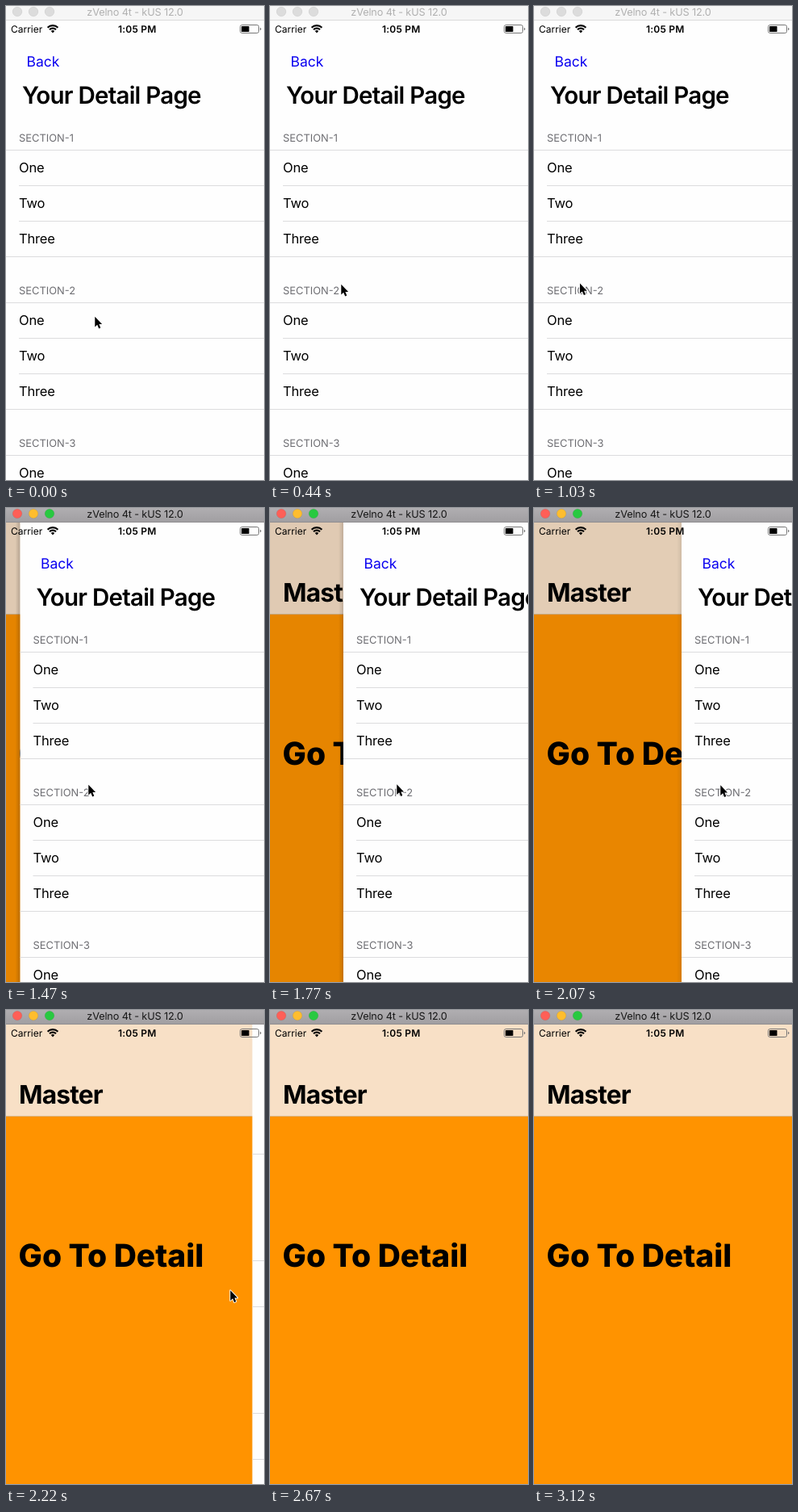
Recreate the animation shown at these times as an HTML page. Size 320 by 587 pixels, loop 3.72 s.

```html
<!DOCTYPE html>
<html lang="en">
<head>
<meta charset="utf-8">
<title>Swipe back</title>
<style>
  html, body { margin: 0; width: 100%; height: 100%; overflow: hidden; background: #fff; }
  svg { display: block; width: 100%; height: 100%; }
  text {
    font-family: Inter, Roboto, sans-serif;
    font-optical-sizing: none;
    text-rendering: geometricPrecision;
    white-space: pre;
  }
  .caption { font-size: 12.7px; letter-spacing: -.01em; text-anchor: middle; }
  .carrier { font-size: 12px; }
  .clock { font-size: 12px; font-weight: 600; letter-spacing: .2px; }
  .master { font-size: 31.7px; font-weight: 700; letter-spacing: -.025em; }
  .link { font-size: 39px; font-weight: 800; }
  .back { font-size: 17.5px; fill: #0a00f0; }
  .heading { font-size: 29.5px; font-weight: 600; letter-spacing: -.026em; }
  .section { font-size: 12.9px; fill: #6d6d72; }
  .row { font-size: 16.5px; letter-spacing: -.01em; }
</style>
</head>
<body>
<svg viewBox="0 0 320 587" xmlns="http://www.w3.org/2000/svg">
  <defs>
    <linearGradient id="edge">
      <stop offset="0" stop-opacity="0"/>
      <stop offset="1" stop-opacity=".2"/>
    </linearGradient>
    <linearGradient id="chrome" x2="0" y2="1">
      <stop offset="0" stop-color="#b0aeb1"/>
      <stop offset="1" stop-color="#a09ea1"/>
    </linearGradient>
  </defs>

  <g id="masterView">
    <rect y="17" width="320" height="114" fill="#f8e0c6"/>
    <rect y="131" width="320" height="1" fill="#d9b98c"/>
    <rect y="132" width="320" height="455" fill="#ff9300"/>
    <text class="master" x="16" y="116">Master</text>
    <text class="link" x="15.6" y="318">Go To Detail</text>
    <rect id="dim" y="17" width="320" height="570"/>
  </g>

  <g id="page">
    <rect id="shadow" x="-6" y="18" width="6" height="569" fill="url(#edge)"/>
    <rect y="17" width="320" height="570" fill="#fefefe"/>
    <text class="back" x="25.5" y="75">Back</text>
    <text class="heading" x="20" y="121">Your Detail Page</text>
    <g id="list"></g>
  </g>

  <g id="status">
    <text class="carrier" x="6" y="32.5">Carrier</text>
    <g fill="none" stroke="#000" stroke-width="2.1">
      <path d="M51.6 26.8a9 9 0 0 1 12.8 0M54 29.3a5.7 5.7 0 0 1 8 0"/>
      <path d="M58 33.4l-2.2-2.3a3.1 3.1 0 0 1 4.4 0z" fill="#000" stroke="none"/>
    </g>
    <text class="clock" x="139" y="32.5">1:05 PM</text>
    <rect x="290.5" y="23.5" width="23" height="10" rx="2.2" fill="none" stroke="#777"/>
    <rect x="292" y="25" width="9.5" height="7" rx=".6"/>
    <path d="M315 26.8q1.5.5 1.5 1.7t-1.5 1.7z" fill="#777"/>
  </g>

  <g id="titleBar">
    <rect id="bar" width="320" height="18"/>
    <rect id="rule" y="17" width="320" height="1"/>
    <g id="lights"></g>
    <text id="caption" class="caption" x="160" y="11.8">zVelno 4t - kUS 12.0</text>
  </g>

  <path id="cursor" d="M.3 .8V13.4L3.2 10.8L5.2 15.4L7.3 14.5L5.4 10H9.1Z" stroke="#fff" stroke-width="1.9"
        stroke-linejoin="round" paint-order="stroke"/>
</svg>

<script>
const LOOP = 3720;
const TICK = 148;  // the screen refreshes in coarse steps
const LEAD = 10;
const AWAKE = 9;   // tick at which the window becomes active
const $ = id => document.getElementById(id);

// key points: tick, then values
const pointerPath = [
  [0, 110, 384], [1, 115, 376], [3, 88, 344], [5, 60, 342], [8, 55, 343],   // approach
  [10, 102, 342], [12, 157, 341.5], [14, 231, 342.5], [15, 278, 346.5],     // drag
  [17, 310, 358], [18, 330, 400], [20, 259, 545], [21, 224, 600]            // leave and return
];
const pagePath = [[9, 0], [10, 17.5], [11, 47], [12, 91], [14, 183], [15, 305.5], [16, 320]];

// linear position along a path, held at both ends
function along(path, n) {
  const next = path.findIndex(key => key[0] > n);
  if (next < 1) return path.at(next).slice(1);
  const [a, b] = [path[next - 1], path[next]];
  const p = (n - a[0]) / (b[0] - a[0]);
  return a.slice(1).map((v, i) => v + (b[i + 1] - v) * p);
}

const label = (cls, x, y, str) => `<text class="${cls}" x="${x}" y="${y}">${str}</text>`;
const line = (x, y) => `<rect x="${x}" y="${y}" width="${320 - x}" height="1" fill="#dcdcde"/>`;

function buildList() {
  let out = "";
  for (let s = 0; s < 3; s++) {
    const top = 178 + s * 189;
    out += label("section", 16, top - 10, "SECTION-" + (s + 1)) + line(0, top);
    ["One", "Two", "Three"].forEach((name, i) => {
      const y = top + i * 44;
      out += label("row", 16, y + 28, name) + line(i < 2 ? 16 : 0, y + 44);
    });
  }
  $("list").innerHTML = out;
}

function paintWindow(active) {
  const colors = active ? ["#ff5f57", "#ffbd2e", "#28c940"] : Array(3).fill("#dcdcdc");
  $("lights").innerHTML = colors.map((color, i) =>
    `<circle cx="${14 + i * 20}" cy="7" r="5.8" fill="${color}" stroke="#000" stroke-opacity=".12" stroke-width=".6"/>`
  ).join("");
  $("bar").setAttribute("fill", active ? "url(#chrome)" : "#f6f6f6");
  $("rule").setAttribute("fill", active ? "#8f8d90" : "#dadada");
  $("caption").setAttribute("fill", active ? "#161616" : "#b0b0b0");
}

function draw(time) {
  const n = Math.floor((time % LOOP + LEAD) / TICK);
  const [offset] = along(pagePath, n);
  const [x, y] = along(pointerPath, n);
  const dragging = offset < 300;
  paintWindow(n >= AWAKE);
  $("page").setAttribute("transform", `translate(${offset})`);
  $("shadow").setAttribute("opacity", 1 - offset / 320);
  $("dim").setAttribute("opacity", dragging ? 0.105 - 0.03 * offset / 320 : 0);
  // the pointer rests out of sight below the list after its last key
  $("cursor").setAttribute("transform", `translate(${x} ${y})`);
}

buildList();
const start = performance.now();
function tick() {
  draw(performance.now() - start);
  requestAnimationFrame(tick);
}
tick();
</script>
</body>
</html>
```
